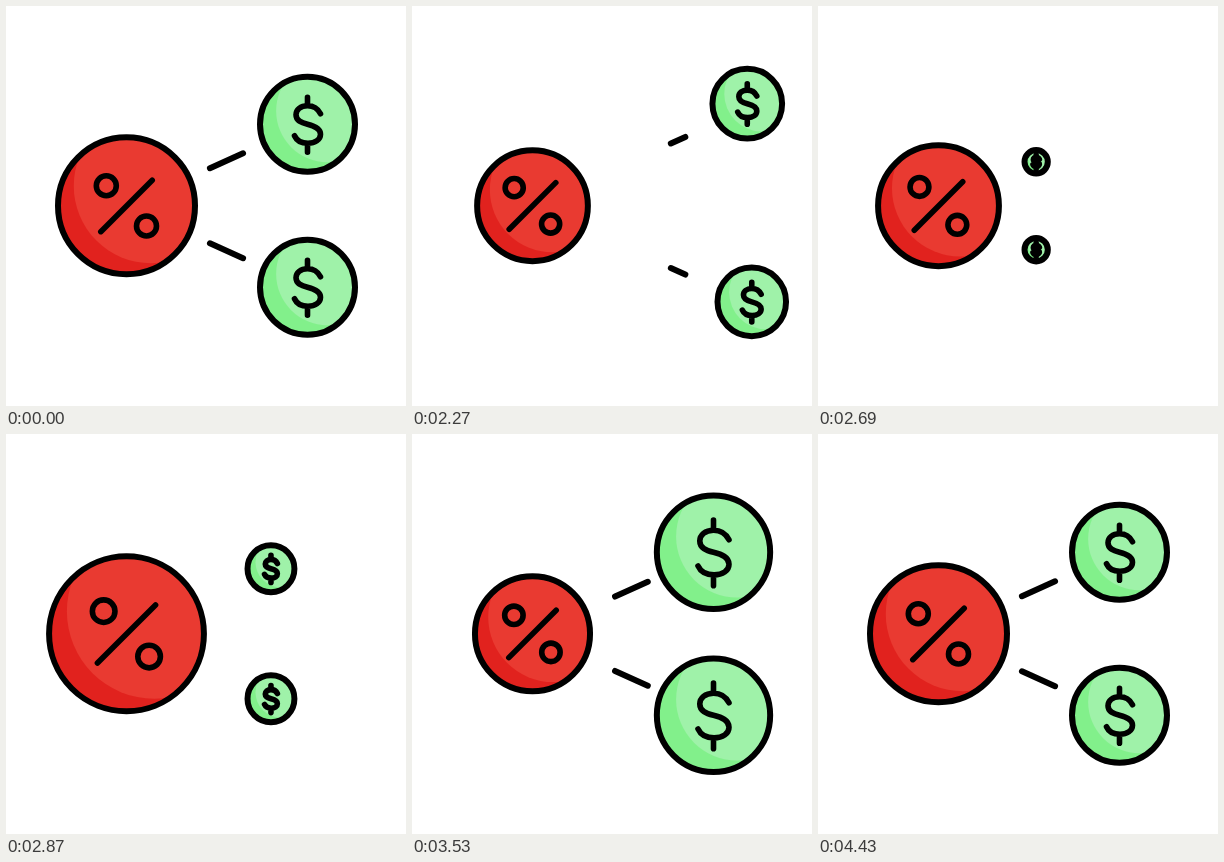
An HTML page with a canvas that plays this animation: 400 px wide and 400 px high, repeating every 4.46 s.

```html
<!DOCTYPE html>
<html lang="en">
<head>
<meta charset="utf-8">
<title>Percent to dollars</title>
<style>
html, body { margin: 0; width: 100%; height: 100%; overflow: hidden; background: #fff; }
canvas { display: block; width: 400px; height: 400px; }
</style>
</head>
<body>
<canvas id="stage" width="400" height="400"></canvas>
<script>
const ctx = document.getElementById('stage').getContext('2d');
const LOOP = 4460;
const HUB = { x: 120.5, y: 199.75, r: 68.5 };
const COIN_R = 47.5;
const INK = '#000';
const RED = { base: '#e1221e', light: '#e93a31', dx: 0.36, dy: -0.29, r: 1.13 };
const GREEN = { base: '#82f08b', light: '#9ff2a9', dx: 0.42, dy: -0.28, r: 1.08 };

// Each branch: resting coin centre, exit point, exit radius and look of the fading outline
const BRANCHES = [
  { x: 301.5, y: 118.25, outX: 361.5, outY: 81.7, outR: 25, ring: 2.4, tint: '#34623d' },
  { x: 301.5, y: 281.25, outX: 369.5, outY: 307.2, outR: 24, ring: 1.6, tint: '#23432c' }
];

const dollar = new Path2D(
  'M13-10.5C10.5-15.5 5.5-18.5 0-18.5C-7-18.5-11.5-14.5-11.5-9.5' +
  'C-11.5-3.5-6-1.5 0 0C7 1.7 13 4 13 10C13 15.5 7.5 19 .5 19' +
  'C-6 19-11 16-13 11.5M0-27V-18.5M0 19V28');
const percent = new Path2D(
  'M-25.7 25.9L25.7-25.5M-10.2-20a10 10 0 1 1-20 0a10 10 0 1 1 20 0' +
  'M30 20.2a10 10 0 1 1-20 0a10 10 0 1 1 20 0');

const mix = (a, b, k) => a + (b - a) * k;
const smooth = k => k * k * (3 - 2 * k);
const span = (t, a, b) => Math.min(1, Math.max(0, (t - a) / (b - a)));

// Eased value through [time, value] stops
function track(t, stops) {
  let v = stops[0][1];
  for (let i = 1; i < stops.length; i++) {
    const [t0, v0] = stops[i - 1], [t1, v1] = stops[i];
    if (t >= t0) v = mix(v0, v1, smooth(span(t, t0, t1)));
  }
  return v;
}

function circle(x, y, r) {
  ctx.beginPath();
  ctx.arc(x, y, r, 0, Math.PI * 2);
}

function disc(x, y, r, skin) {
  ctx.save();
  circle(x, y, r);
  ctx.fillStyle = skin.base;
  ctx.fill();
  ctx.clip();
  circle(x + skin.dx * r, y + skin.dy * r, skin.r * r);
  ctx.fillStyle = skin.light;
  ctx.fill();
  ctx.restore();
  circle(x, y, r);
  outline(6, INK);
}

function outline(width, color) {
  ctx.lineWidth = width;
  ctx.strokeStyle = color;
  ctx.stroke();
}

// Symbols scale while their line weight stays the same
function symbol(path, x, y, s, color, weight = 5.6) {
  const p = new Path2D();
  p.addPath(path, new DOMMatrix([s, 0, 0, s, x, y]));
  ctx.lineWidth = weight;
  ctx.strokeStyle = color;
  ctx.stroke(p);
}

function coin(x, y, r) {
  if (r < 1) return;
  disc(x, y, r, GREEN);
  symbol(dollar, x, y, r / COIN_R, INK);
}

function fadingCoin(x, y, r, b) {
  circle(x, y, r - b.ring / 2);
  outline(b.ring, b.tint);
  symbol(dollar, x, y, r / COIN_R, b.tint, 5);
}

function link(b, from, to) {
  ctx.beginPath();
  ctx.moveTo(mix(HUB.x, b.x, from), mix(HUB.y, b.y, from));
  ctx.lineTo(mix(HUB.x, b.x, to), mix(HUB.y, b.y, to));
  outline(6, INK);
}

function leave(b, t) {
  const k = smooth(span(t, 2000, 2500));
  link(b, mix(0.461, 1, k), mix(0.644, 1, k));
  const x = mix(b.x, b.outX, k), y = mix(b.y, b.outY, k), r = mix(COIN_R, b.outR, k);
  if (t < 2455) coin(x, y, r);
  else fadingCoin(x, y, r, b);
}

function arrive(b, t) {
  const k = smooth(span(t, 2480, 3600));
  link(b, 0.461 * k, 0.644 * k);
  const p = span(t, 2470, 3440);
  const go = 1 - (1 - p) ** 3;
  const r = t < 3440
    ? 58.5 * mix(p, smooth(p), 0.3)
    : track(t, [[3440, 58.5], [3920, 39], [4440, COIN_R]]);
  coin(mix(HUB.x, b.x, go), mix(HUB.y, b.y, go), r);
}

function draw(t) {
  ctx.fillStyle = '#fff';
  ctx.fillRect(0, 0, 400, 400);
  ctx.lineCap = ctx.lineJoin = 'round';

  for (const b of BRANCHES) (t < 2500 ? leave : arrive)(b, t);

  const r = track(t, [[2000, HUB.r], [2480, 46.5], [2960, 80.5], [3440, 56.4], [3920, HUB.r]]);
  const s = r / HUB.r;
  disc(HUB.x, HUB.y, r, RED);
  symbol(percent, HUB.x, HUB.y, s < 1 ? mix(1, s, 0.49) : s, INK);
}

function tick() {
  draw(performance.now() % LOOP);
  requestAnimationFrame(tick);
}
tick();
</script>
</body>
</html>
```
